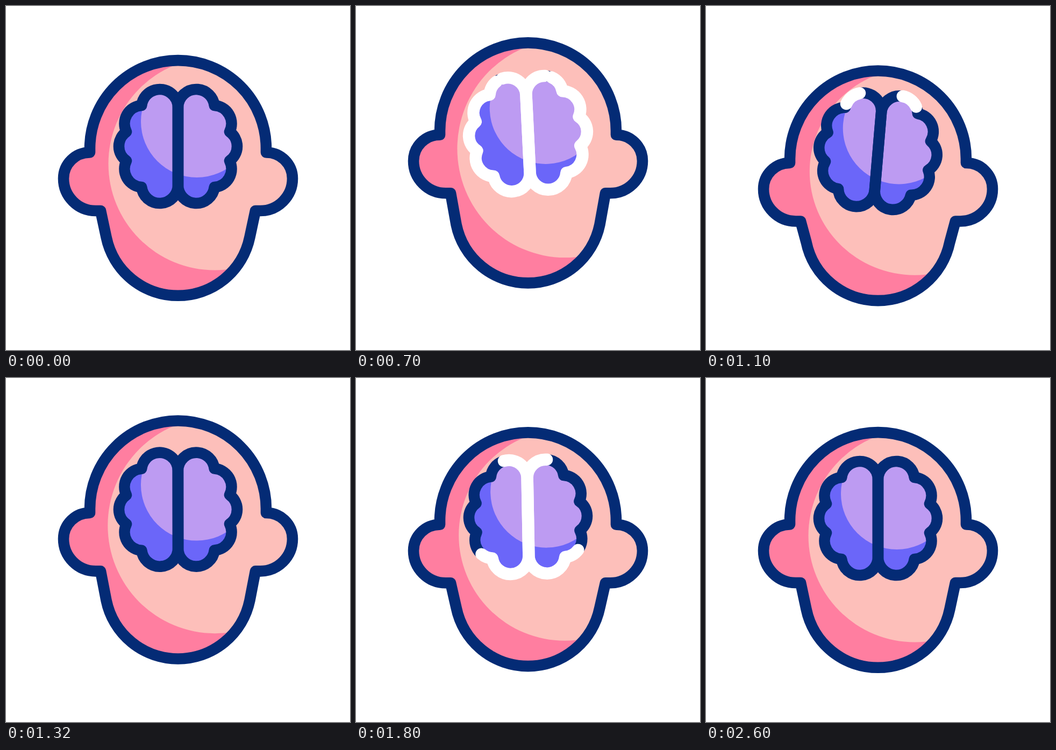
Animation, 640 px wide and 640 px high, one loop 3 s. Source, as an HTML page:

```html
<!DOCTYPE html>
<html lang="en">
<head>
<meta charset="utf-8">
<title>Mind</title>
<style>
  html, body { margin: 0; width: 100%; height: 100%; overflow: hidden; background: #fff; }
  svg { display: block; width: 100vw; height: 100vh; }
  .line { fill: none; stroke: #042b75; stroke-width: 20.6; stroke-linejoin: round; }
  .glow { fill: none; stroke: #fff; stroke-width: 22.5; stroke-linecap: round; stroke-linejoin: round; }
</style>
</head>
<body>
<svg viewBox="0 0 640 640">
  <defs>
    <clipPath id="headClip"><path class="head"/></clipPath>
    <clipPath id="brainClip"><path class="left"/><path class="right"/></clipPath>
  </defs>
  <path class="head" fill="#ff7ea0"/>
  <g clip-path="url(#headClip)"><ellipse id="light" cx="388.5" fill="#fdbfba"/></g>
  <path class="head line"/>
  <g id="brain">
    <g clip-path="url(#brainClip)">
      <rect x="200" y="140" width="240" height="240" fill="#6b66f9"/>
      <circle cx="355" cy="215" r="104" fill="#bd9bf2"/>
    </g>
    <path class="left line"/>
    <path class="right line"/>
    <path class="left glow" pathLength="1"/>
    <path class="right glow" pathLength="1"/>
  </g>
</svg>
<script>
const LOOP = 3000;
const all = s => document.querySelectorAll(s);
const setAll = (s, name, value) => all(s).forEach(el => el.setAttribute(name, value));

// [time, value] steps, eased in and out between neighbours
const tracks = {
  skull: [[200, 0], [567, -45], [1043, 22], [1508, -45], [1985, 22], [2450, -2], [2600, 0]],
  chin:  [[200, 0], [570, -31], [1040, 11], [1510, -31], [1985, 11], [2450, 0]],
  tilt:  [[200, 0], [540, -5], [1060, 5], [1578, -5], [2095, 5], [2600, 0]]
};
const sweeps = [0, 1220];
const growth = [[378, 0], [735, 1]];
const decay = [[787, 0], [1160, 1]];

function at(steps, t) {
  if (t <= steps[0][0]) return steps[0][1];
  for (let i = 1; i < steps.length; i++) {
    const [t0, a] = steps[i - 1], [t1, b] = steps[i];
    if (t < t1) return a + (b - a) * (1 - Math.cos(Math.PI * (t - t0) / (t1 - t0))) / 2;
  }
  return steps[steps.length - 1][1];
}

// One brain half; side is -1 for left, 1 for right, start is the seam's distance from the middle
function half(side, start) {
  const p = (x, y) => `${320 + side * x} ${y}`;
  const arc = (r, x, y) => `A${r} ${r} 0 0 ${side < 0 ? 1 : 0} ${p(x, y)}`;
  const y0 = 189 - Math.sqrt(34 * 34 - (start - 34) ** 2);
  const notch = 34 + Math.sqrt(34 * 34 - 4 * 4);
  return `M${p(start, y0)}` + arc(34, 0, 189) + `L${p(0, 333)}` +
    arc(34, notch, 337) + arc(34, 96, 288) + arc(33, 96, 234) + arc(34, notch, 185) +
    arc(34, start, y0) + 'Z';
}

function head(top, chin) {
  const y = v => v + top, jaw = 430 + chin;
  return `M156 ${y(265)}A164 164 0 0 1 484 ${y(265)}V${y(272.5)}` +
    `A48.5 48.5 0 0 1 533 ${y(321)}A60 60 0 0 1 473 ${y(381)}H464` +
    `L453.5 ${jaw}A136.3 136.3 0 0 1 186.5 ${jaw}L176 ${y(381)}H167` +
    `A60 60 0 0 1 107 ${y(321)}A48.5 48.5 0 0 1 156 ${y(272.5)}Z`;
}

setAll('.left', 'd', half(-1, 43));
setAll('.right', 'd', half(1, 37));
const light = document.getElementById('light');
const brain = document.getElementById('brain');

function draw(t) {
  const top = at(tracks.skull, t), chin = at(tracks.chin, t);
  setAll('.head', 'd', head(top, chin));

  const stretch = (chin - top) / 2;
  light.setAttribute('cy', 293.5 + (top + chin) / 2);
  light.setAttribute('ry', 198 + stretch);
  light.setAttribute('rx', 198 + stretch * 0.45);

  brain.setAttribute('transform', `translate(0 ${chin}) rotate(${at(tracks.tilt, t)} 320 261)`);

  const local = t - (t < sweeps[1] ? sweeps[0] : sweeps[1]);
  const from = at(decay, local), to = at(growth, local);
  setAll('.glow', 'visibility', to - from > 0.0005 ? 'visible' : 'hidden');
  setAll('.glow', 'stroke-dasharray', `${to - from} 2`);
  setAll('.glow', 'stroke-dashoffset', -from);
}

const begin = performance.now();
function tick() {
  draw((performance.now() - begin) % LOOP);
  requestAnimationFrame(tick);
}
tick();
</script>
</body>
</html>
```
